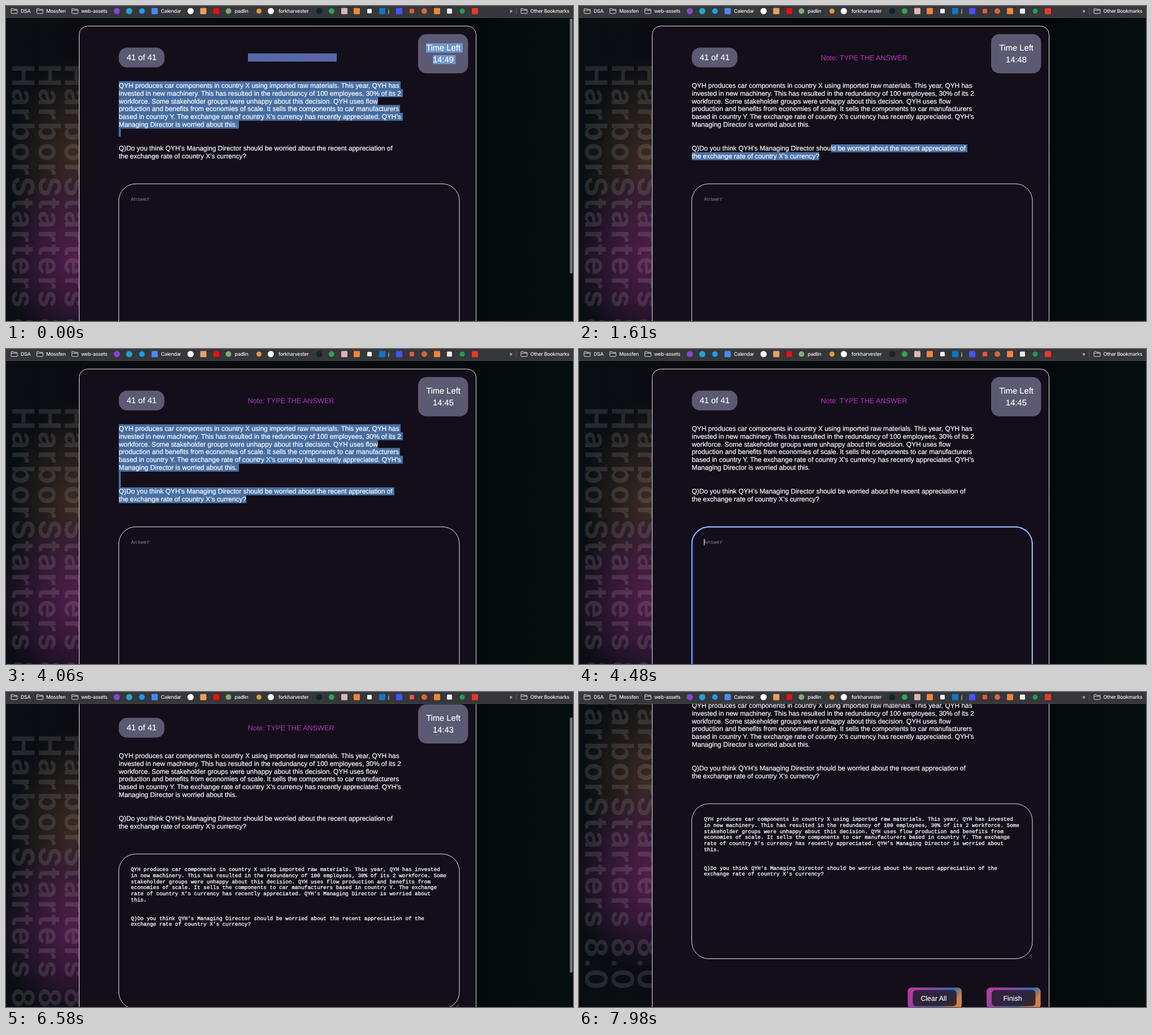
Animation, 1003 px wide and 558 px high, one loop 8000 ms. Source, as an HTML page:

```html
<!DOCTYPE html>
<html lang="en">
<head>
<meta charset="utf-8">
<title>Quiz answer</title>
<style>
  html, body { margin: 0; width: 100%; height: 100%; overflow: hidden; background: #050b0d; }
  svg { display: block; width: 100%; height: 100%; }
  text { font-family: "Liberation Sans", Arial, sans-serif; fill: #fff; white-space: pre; text-rendering: geometricPrecision; }
  .bar text { font: 500 8.8px Inter, sans-serif; letter-spacing: -.28px; fill: #f0f0f2; }
  .side text { font: 700 54px Inter, sans-serif; letter-spacing: 2.6px; fill: #fff; fill-opacity: .11; }
  .body text { font-size: 11.88px; stroke: #fff; stroke-width: .2; }
  .mono text { font: 9.3px "Liberation Mono", monospace; stroke: #fff; stroke-width: .3; }
  .mono .hint { fill: #85838b; stroke: none; }
  .mid text { text-anchor: middle; stroke: #fff; stroke-width: .15; }
</style>
</head>
<body>
<svg id="stage" viewBox="0 0 1003 558" preserveAspectRatio="none">
  <defs>
    <linearGradient id="base">
      <stop offset="0" stop-color="#090e12"/><stop offset=".13" stop-color="#0a0c11"/>
      <stop offset=".83" stop-color="#030a0c"/><stop offset="1" stop-color="#05100e"/>
    </linearGradient>
    <radialGradient id="brown"><stop offset="0" stop-color="#4a3528" stop-opacity=".8"/><stop offset="1" stop-color="#4a3528" stop-opacity="0"/></radialGradient>
    <radialGradient id="purple"><stop offset="0" stop-color="#58204f" stop-opacity=".95"/><stop offset=".5" stop-color="#481c48" stop-opacity=".65"/><stop offset="1" stop-color="#401a45" stop-opacity="0"/></radialGradient>
    <linearGradient id="rim" x2="1" y2=".35">
      <stop offset="0" stop-color="#c23a9c"/><stop offset=".4" stop-color="#9043a6"/>
      <stop offset=".78" stop-color="#2f6cb4"/><stop offset="1" stop-color="#d5823f"/>
    </linearGradient>
  </defs>
  <g id="page">
    <rect y="-10" width="1003" height="720" fill="url(#base)"/>
    <ellipse cx="130" cy="275" rx="125" ry="185" fill="url(#brown)"/>
    <ellipse cx="132" cy="445" rx="150" ry="170" fill="url(#purple)"/>
    <g class="side" id="side"></g>
    <rect x="129.5" y="35.5" width="702" height="700" rx="15" fill="#130e1a" stroke="#e4e4e8"/>
    <rect x="199.5" y="73.8" width="80.8" height="35" rx="14.8" fill="#5c5a72"/>
    <rect x="729" y="49.7" width="88.4" height="69.6" rx="14.8" fill="#5c5a72"/>
    <g id="marks" fill="#4a70a3"></g>
    <g id="extra">
      <rect x="428" y="84" width="157" height="14.5" fill="#4a70a3"/>
      <rect x="743" y="66" width="65" height="16.5" fill="#7096cb"/>
      <rect x="755" y="87" width="40.5" height="16" fill="#7096cb"/>
    </g>
    <g class="mid" font-size="14.7">
      <text x="240" y="96.3">41 of 41</text>
      <text x="773.5" y="79">Time Left</text>
      <text x="773.5" y="100" id="clock"></text>
    </g>
    <text x="427.7" y="95.5" font-size="12.6" id="note">Note: TYPE THE ANSWER</text>
    <g class="body" id="body"></g>
    <rect x="199.5" y="315" width="602.5" height="274.5" rx="30" fill="none" stroke="#e4e4e8"/>
    <g id="ring" fill="none">
      <rect x="200.6" y="316.1" width="600.3" height="272.3" rx="29" stroke="#1f62d8" stroke-width="1.4"/>
      <rect x="199.5" y="315" width="602.5" height="274.5" rx="30" stroke="#cfe2ff" stroke-width="1.1"/>
    </g>
    <path d="M796 587l5 -5M799 587l2 -2" stroke="#aaa" stroke-width=".8"/>
    <g class="mono">
      <text x="221" y="345" class="hint" id="hint">Answer</text>
      <g id="answer"></g>
    </g>
    <rect id="caret" width="1" height="11" fill="#fff"/>
    <g class="mid" id="buttons"></g>
  </g>
  <rect id="thumb" x="997.5" width="4.5" height="452" rx="2.2" fill="#77797a"/>
  <g class="bar" id="bar">
    <rect width="1003" height="21" fill="#36373a"/>
    <rect y="20" width="1003" height="1" fill="#47484b"/>
    <rect x="902.5" y="3" width="1" height="12" fill="#5a5b5f"/>
  </g>
</svg>
<script>
const LOOP = 8000, STEP = 70, LEFT = 199.5, ROW = 13.96;
const $ = id => document.getElementById(id);
const clamp = v => Math.max(0, Math.min(1, v));

function add(parent, tag, attrs, text) {
  const el = document.createElementNS("http://www.w3.org/2000/svg", tag);
  for (const k in attrs) el.setAttribute(k, attrs[k]);
  if (text) el.textContent = text;
  parent.appendChild(el);
  return el;
}
const show = (id, on) => $(id).setAttribute("visibility", on ? "visible" : "hidden");

const question = [
  "QYH produces car components in country X using imported raw materials. This year, QYH has",
  "invested in new machinery. This has resulted in the redundancy of 100 employees, 30% of its 2",
  "workforce. Some stakeholder groups were unhappy about this decision. QYH uses flow",
  "production and benefits from economies of scale. It sells the components to car manufacturers",
  "based in country Y. The exchange rate of country X’s currency has recently appreciated. QYH’s",
  "Managing Director is worried about this.", "", "",
  "Q)Do you think QYH’s Managing Director should be worried about the recent appreciation of",
  "the exchange rate of country X’s currency?"
];
const rowEnds = [698, 702, 658, 697, 702, 412, 203, 203, 687, 425];
const answer = [
  "QYH produces car components in country X using imported raw materials. This year, QYH has invested",
  "in new machinery. This has resulted in the redundancy of 100 employees, 30% of its 2 workforce. Some",
  "stakeholder groups were unhappy about this decision. QYH uses flow production and benefits from",
  "economies of scale. It sells the components to car manufacturers based in country Y. The exchange",
  "rate of country X’s currency has recently appreciated. QYH’s Managing Director is worried about",
  "this.", "", "",
  "Q)Do you think QYH’s Managing Director should be worried about the recent appreciation of the",
  "exchange rate of country X’s currency?"
];
question.forEach((s, i) => add($("body"), "text", { x: LEFT, y: 144.6 + ROW * i }, s));
answer.forEach((s, i) => add($("answer"), "text", { x: 221, y: 345 + 10.83 * i }, s));
const marks = rowEnds.map((_, i) =>
  add($("marks"), "rect", { y: 133.4 + ROW * i, height: ROW + .1 }));

for (const x of [11, 57.5, 104])
  add($("side"), "text", { transform: `translate(${x} 103) rotate(90)` }, "HarborStarters 8.0");

[[581.5, "Clear All"], [721, "Finish"]].forEach(([x, label]) => {
  const g = $("buttons");
  add(g, "rect", { x, y: 640.5, width: 95.5, height: 37.5, rx: 7, fill: "url(#rim)" });
  add(g, "rect", { x: x + 9, y: 645, width: 77.5, height: 28.5, rx: 6, fill: "#2b2033", "fill-opacity": .92 });
  add(g, "text", { x: x + 46, y: 663.6, "font-size": 12.4 }, label);
});

// Bookmarks bar
const bar = $("bar");
for (const x of [9, 54.5, 116.5, 911])
  add(bar, "path", {
    d: `M${x} 12.2v-7q0 -.8 .8 -.8h3l1.2 1.5h5q.9 0 .9 .9v5.6q0 .9 -.9 .9h-9.1q-.9 0 -.9 -.9zM${x} 7.4h10.9`,
    fill: "none", stroke: "#d6d6d9", "stroke-width": 1
  });
[[26, "DSA"], [71, "Mossfen"], [133, "web-assets"], [274, "Calendar"], [404.5, "padlin"],
 [482, "forkharvester"], [676, "j"], [890.5, "»"], [927.5, "Other Bookmarks"]]
  .forEach(([x, s]) => add(bar, "text", { x, y: 12.2 }, s));

const dot = (cx, fill, r = 5.5) => add(bar, "circle", { cx, cy: 9, r, fill });
const tile = (cx, fill, w = 11) =>
  add(bar, "rect", { x: cx - w / 2, y: 9 - w / 2, width: w, height: w, rx: 1.5, fill });
dot(196, "#8146d6"); dot(218, "#22a3cf"); dot(240.5, "#1d9bf0", 5);
tile(263, "#4a8af4"); dot(326.5, "#fff"); tile(349, "#eda05c");
tile(372, "#f20d0d", 10); dot(393.5, "#86a878", 5); dot(447.5, "#e39a35", 4.5);
dot(468.5, "#fff"); dot(554, "#0f2630"); dot(576, "#2fa35a", 5);
tile(598.5, "#dcb4b8"); tile(620.5, "#f0843c"); tile(643, "#f4f4f4", 8);
tile(665.5, "#0a78c8"); tile(695.5, "#4353ff"); tile(718, "#e8553c", 8);
dot(740, "#d06a3c", 5); tile(762.5, "#f0843c"); tile(784.5, "#ececec", 9);
dot(807, "#1f9d55", 4.5); tile(829.5, "#e8382a");

const easeOut = (t, from, to) => 1 - (1 - clamp((t - from) / (to - from))) ** 2;

function select(t) {
  let first = 10, last = 9, x = LEFT;
  if (t < 350) {
    first = 0;
    last = 6;
  } else if (t >= 1610 && t < 4340) {
    const p = clamp((t - 1610) / 350);
    first = Math.round(8 * (1 - p));
    x = 446 - (446 - LEFT) * p;
  }
  marks.forEach((m, i) => {
    const start = i === first ? Math.min(x, rowEnds[i] - 3) : LEFT;
    m.setAttribute("x", start);
    m.setAttribute("width", i >= first && i <= last ? rowEnds[i] - start : 0);
  });
  show("extra", t < 350);
  $("note").style.fill = t < 350 ? "#a044c0" : "#b735be";
}

function draw(time) {
  const t = Math.floor(time / STEP) * STEP;
  const scroll = 28 * easeOut(t, 6300, 6580) + 89 * easeOut(t, 6860, 7280);
  $("page").setAttribute("transform", `translate(0 ${-scroll})`);
  $("thumb").setAttribute("y", 22 + .825 * scroll);
  $("thumb").setAttribute("opacity",
    t < 6370 ? 1 - clamp((t - 280) / 350) : 1 - clamp((t - 7770) / 210));

  const ticks = Math.floor((t - 925) / 1035) + 1;
  $("clock").textContent = "14:" + (49 - ticks);

  select(t);
  const pasted = t >= 4970;
  show("answer", pasted);
  show("hint", !pasted);
  show("ring", t >= 4340 && t < 5670);
  show("caret", (t >= 4340 && t < 4830) || (pasted && t < 5530));
  $("caret").setAttribute("x", pasted ? 433.5 : 221);
  $("caret").setAttribute("y", pasted ? 434 : 336.5);
}

const begin = performance.now();
(function tick() {
  draw((performance.now() - begin) % LOOP);
  requestAnimationFrame(tick);
})();
</script>
</body>
</html>
```
